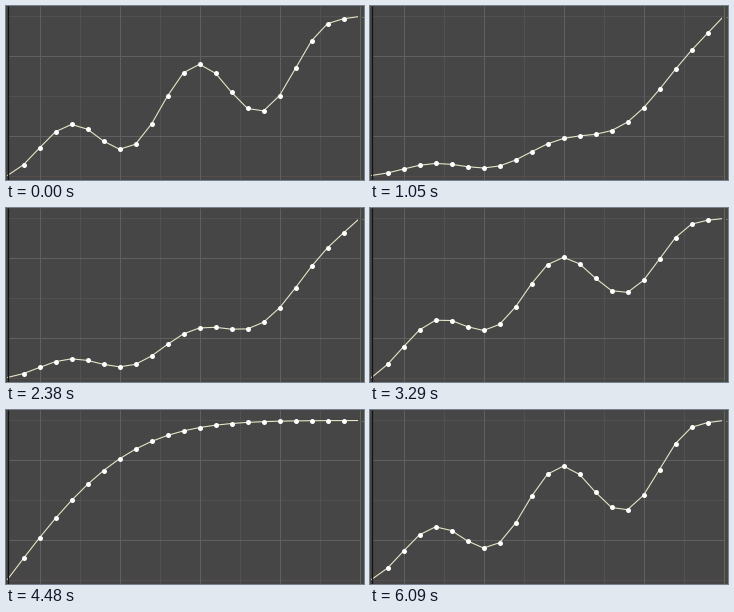
A matplotlib script that plays this animation: 358x174 px, repeating every 6160 ms.

```python
import math

import numpy as np
import matplotlib.pyplot as plt
from matplotlib.animation import FuncAnimation

W, H, DPI = 358, 174, 100
STEP, LOOP = 70, 6160
PX = 72 / DPI

LEFT, RIGHT, BASE, RISE = 1.5, 353.5, 169.5, 159
BG, MINOR, MAJOR = "#464646", "#515151", "#606060"
LINE, DOT = "#e6e6c6", "#ffffff"

t = np.linspace(0, 1, 23)
x = LEFT + (RIGHT - LEFT) * t

# Three shapes: soft start, soft end, and a growing wave between them
ease_out = np.array([math.erf(2.607 * u) for u in t])
ease_in = 1 - ease_out[::-1]
swing = (.255 + .32 * t**6) * np.sin(2 * np.pi * (2.5 * t - .085))
wave = ease_in + (.465 - .04 * t + swing) * (ease_out - ease_in)

# Slider over time: 0 = soft start, 0.5 = wave, 1 = soft end
KEYS = [(0, .5), (1050, .115), (1500, 0), (1890, 0), (2380, .18),
        (3290, .61), (4480, 1), (4900, 1), (LOOP, .5)]


def slider(ms):
    return np.interp(ms, *zip(*KEYS))


def curve(v):
    if v < .5:
        h = ease_in + 2 * v * (wave - ease_in)
    else:
        h = wave + (2 * v - 1) * (ease_out - wave)
    return BASE - RISE * h


fig = plt.figure(figsize=(W / DPI, H / DPI), dpi=DPI, facecolor=BG)
ax = fig.add_axes([0, 0, 1, 1])
ax.set(xlim=(0, W), ylim=(H, 0))
ax.axis("off")


def rule(xs, ys, color, width=1, z=1):
    ax.plot(xs, ys, color=color, lw=width * PX, zorder=z, solid_capstyle="butt")


def column(px, color, width=1, z=1):
    rule([px, px], [0, H], color, width, z)


def row(py, color, z=1):
    rule([LEFT, RIGHT], [py, py], color, z=z)


# Grid lines every 40 px, alternating strong and faint
for k in range(8):
    column(33.5 + 40 * k, *((MINOR, 1, 1) if k % 2 else (MAJOR, 1, 2)))
for k in range(4):
    row(9.5 + 40 * k, *((MAJOR, 2) if k % 2 else (MINOR, 1)))

row(BASE, "#554e4c")
column(RIGHT, "#5f6a54", z=6)
column(LEFT, "#141414", 1.3, 6)
rule([355.5, 357], [10.5, 10.5], "#a0a070", z=3)

line, = ax.plot([], [], color=LINE, lw=1.1 * PX, zorder=4)
line.set_clip_path(plt.Rectangle((0, 0), RIGHT - 1.5, H, transform=ax.transData))
dots, = ax.plot([], [], "o", color=DOT, ms=5 * PX, mew=0, zorder=5)


def draw(i):
    y = curve(slider(i * STEP))
    line.set_data(x, y)
    dots.set_data(x[1:-1], y[1:-1])
    return line, dots


anim = FuncAnimation(fig, draw, frames=LOOP // STEP, interval=STEP,
                     repeat=True, repeat_delay=0)
plt.show()
```
